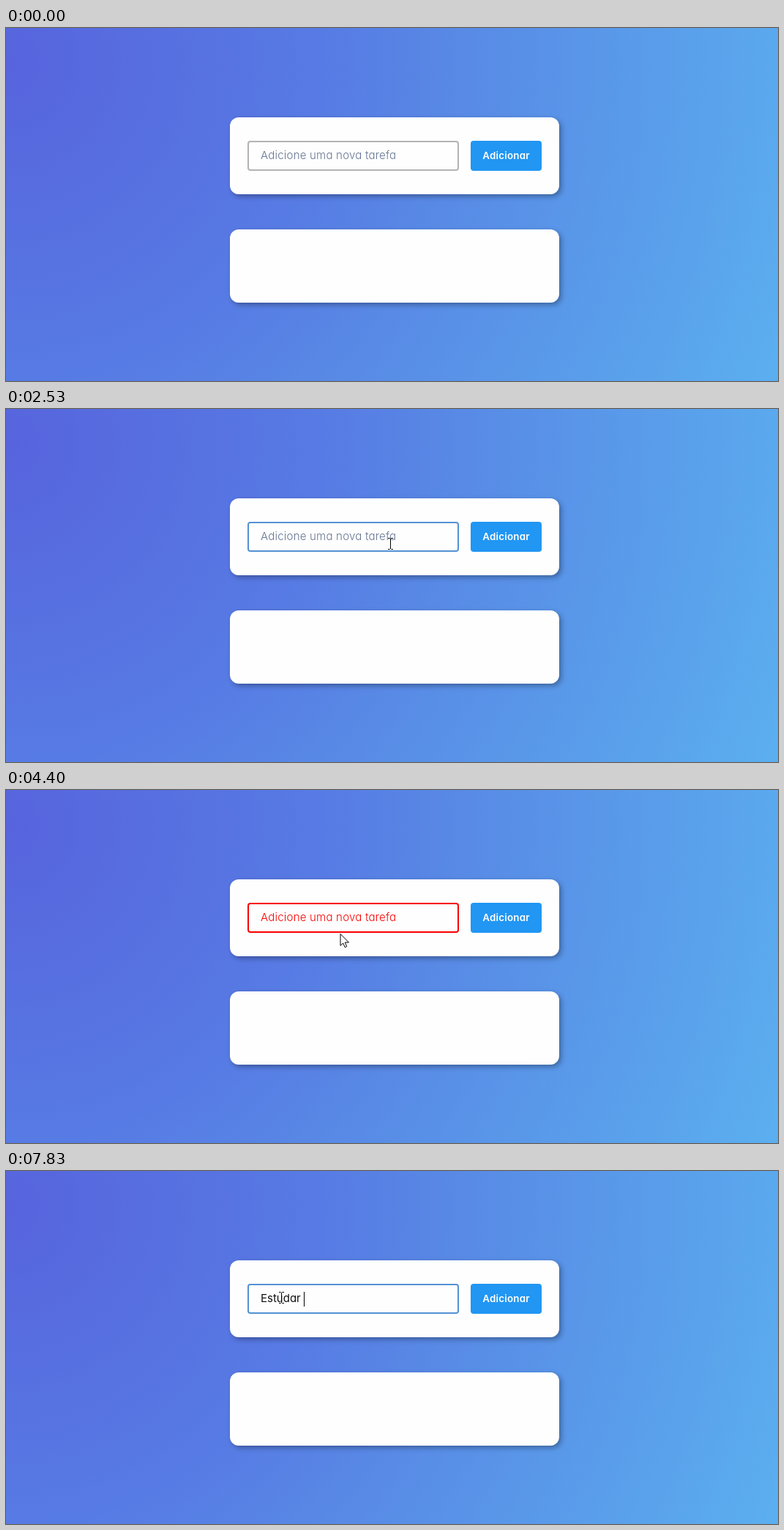
These frames come from a looping animation (1055 by 482 pixels, 8 s). An HTML page:

```html
<!DOCTYPE html>
<html lang="pt-BR">
<head>
<meta charset="utf-8">
<title>Lista de tarefas</title>
<style>
  html, body { margin: 0; width: 100%; height: 100%; overflow: hidden; }
  body {
    position: relative;
    background: radial-gradient(circle at 0 50px, #5764dd 0, #577be4 434px, #5888e5 600px, #5bafef 1140px);
    font-family: Inter, "Open Sans", sans-serif;
    font-feature-settings: "cv11";
  }
  body *, svg { position: absolute; box-sizing: border-box; }
  .card {
    left: 306px; width: 450px; border-radius: 12px; background: #fefefe;
    box-shadow: 3px 3px 7px rgba(0, 0, 0, .32);
  }
  .form { top: 122px; height: 105px; }
  .list { top: 275px; height: 100px; }
  #field {
    left: 330px; top: 154px; width: 289px; height: 41px;
    border: 2px solid #b3b3b3; border-radius: 4px;
  }
  #hint, #typed {
    left: 348px; top: 155px; line-height: 37px; font-size: 15px; white-space: pre;
  }
  #hint { color: #647491; font-weight: 350; letter-spacing: .22px; }
  #typed { color: #111; }
  #caret { left: 100%; top: 10px; width: 1px; height: 20px; background: #000; }
  .focus #field { border-color: #5492d4; }
  .error #field { border-color: #fa0000; }
  .error #hint { color: #fa0000; }
  #button {
    left: 635px; top: 154px; width: 97px; height: 41px; border-radius: 4px;
    background: #2196f3; color: #fff; font-size: 13.33px; font-weight: 600;
    letter-spacing: .25px; line-height: 40px; text-align: center;
  }
  #button.hover { background: #2a72c6; }
  #glow {
    left: -14px; top: -13px; width: 25px; height: 25px; border-radius: 50%;
    background: rgba(255, 255, 0, .6);
  }
  #cursor { left: 0; top: 0; }
  #cursor svg { left: 0; top: 0; overflow: visible; }
</style>
</head>
<body>
<div class="card form"></div>
<div class="card list"></div>
<div id="field"></div>
<div id="hint">Adicione uma nova tarefa</div>
<div id="typed"><span id="text" style="position: static"></span><i id="caret"></i></div>
<div id="button">Adicionar</div>
<div id="cursor">
  <div id="glow"></div>
  <svg width="1" height="1" fill="#fff" stroke="#000">
    <path id="arrow" d="M.5.5V16.5L4.2 13 6.7 18.8 9.2 17.7 6.8 12.1H12Z"/>
    <g id="beam" fill="none">
      <path stroke="#fff" stroke-width="2" stroke-opacity=".6" d="M0-7V7"/>
      <path d="M-3.5-7.5H-.8M.8-7.5H3.5M0-7V7M-3.5 7.5H-.8M.8 7.5H3.5"/>
    </g>
    <g id="hand" transform="translate(-7 0)">
      <path d="M5 12V2.2a1.8 1.8 0 0 1 3.6 0V8a1.6 1.6 0 0 1 3 .6 1.6 1.6 0 0 1 2.9.9 1.5 1.5 0 0 1 2.6 1.2V16q0 4-2.3 6.5V24.3H7.5V22.4Q5 20 3.5 17L1 13.6q-.9-1.6.6-2.2 1.6-.4 3.4 2.2Z"/>
      <path fill="none" d="M8.6 8V12M11.6 8.6V12M14.5 9.5V12.4"/>
    </g>
  </svg>
</div>
<script>
  const LOOP = 8000, BLINK = 530, GLOW = 160;
  const ENTER = 530, FOCUS = 1560, SUBMIT = 3220, ERROR = 3430, REFOCUS = 5440;
  const WORD = "Estudar ";
  const el = id => document.getElementById(id);
  const show = (id, on) => { el(id).style.display = on ? "" : "none"; };

  // Each stroke runs from the previous rest point and sags downwards midway
  const home = { x: 938, y: 442 };
  const strokes = [
    { from: ENTER, to: 1440, x: 470.5, y: 177, sag: 20 },
    { from: 1920, to: 2200, x: 481, y: 180, sag: 0 },
    { from: 2460, to: 3000, x: 717, y: 181, sag: 6 },
    { from: 3500, to: 3770, x: 649, y: 179, sag: 2 },
    { from: 3770, to: 4820, x: 392, y: 173, sag: 28 },
    { from: 4890, to: 5510, x: 376.5, y: 173, sag: 0 }
  ];

  function pointAt(t) {
    let { x, y } = home;
    for (const s of strokes) {
      if (t < s.from) break;
      const u = Math.min(1, (t - s.from) / (s.to - s.from));
      const k = 1 - (1 - u) ** 1.5;
      x += (s.x - x) * k;
      y += (s.y - y) * k + s.sag * 4 * k * (1 - k);
    }
    return { x, y };
  }

  // Two slow letters, then a steady run
  function typedCount(t) {
    if (t < 6630) return 0;
    if (t < 7160) return 1;
    return Math.max(2, Math.min(WORD.length, 3 + Math.floor((t - 7360) / 94)));
  }

  function stateAt(t) {
    if (t >= REFOCUS) return "focus";
    if (t >= ERROR) return "error";
    return t >= FOCUS && t < SUBMIT ? "focus" : "idle";
  }

  function drawCursor(t) {
    const { x, y } = pointAt(t);
    const inRow = y > 154 && y < 195;
    const kind = inRow && x > 330 && x < 619 ? "beam"
      : inRow && x > 635 && x < 732 ? "hand" : "arrow";
    for (const id of ["arrow", "beam", "hand"]) show(id, id === kind);
    show("cursor", t >= ENTER);
    show("glow", [FOCUS, SUBMIT, REFOCUS].some(c => t >= c && t < c + GLOW));
    el("cursor").style.transform = `translate(${Math.floor(x) + .5}px, ${Math.round(y)}px)`;
    el("button").className = kind === "hand" ? "hover" : "";
  }

  function drawForm(t) {
    const count = typedCount(t), state = stateAt(t);
    const since = t - (t < REFOCUS ? FOCUS : REFOCUS);
    document.body.className = state;
    el("text").textContent = WORD.slice(0, count);
    show("hint", !count);
    show("caret", state === "focus" && (count || since % (2 * BLINK) < BLINK));
  }

  const start = performance.now();
  function frame() {
    const t = (performance.now() - start) % LOOP;
    drawForm(t);
    drawCursor(t);
    requestAnimationFrame(frame);
  }
  frame();
</script>
</body>
</html>
```
